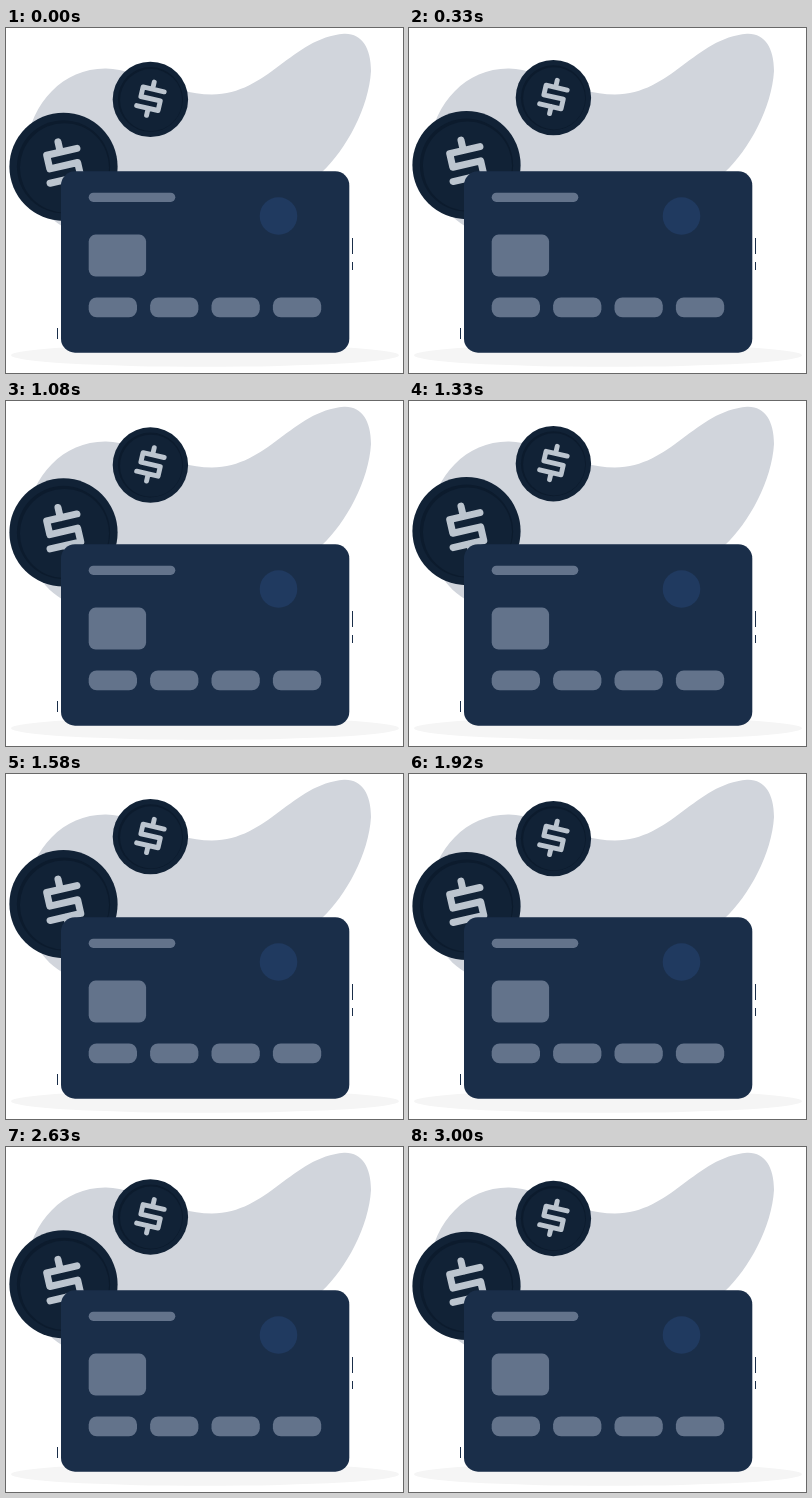
An HTML page with a canvas that plays this animation: 397x345 px, repeating every 3.04 s.

```html
<!DOCTYPE html>
<html lang="en">
<head>
<meta charset="utf-8">
<title>Card and coins</title>
<style>
html, body { margin: 0; width: 100%; height: 100%; overflow: hidden; background: #fff; }
canvas { display: block; }
</style>
</head>
<body>
<canvas id="stage" width="397" height="345"></canvas>
<script>
const W = 397, H = 345, LOOP = 3040, PEAK = 1460, RISE = 9.4;
const canvas = document.getElementById('stage');
const ctx = canvas.getContext('2d');
const dpr = window.devicePixelRatio || 1;
canvas.width = W * dpr;
canvas.height = H * dpr;
canvas.style.width = W + 'px';
canvas.style.height = H + 'px';

const blob = new Path2D(
  'M60 200 C38 190 16 160 20 120 C25 74 58 40 100 40.5 ' +
  'C137 42 162 66 206 66.5 C262 66 286 10 338 5.7 ' +
  'C356 5 365 20 365 43 C363 79 340 122 316 144 L120 200 Z');
const dollar = new Path2D(
  'M17 -14 H-14 V0 H14.5 V14 H-17 M0 -24.5 V-14 M0 14 V24.5');

function disc(x, y, r, color) {
  ctx.fillStyle = color;
  ctx.beginPath();
  ctx.arc(x, y, r, 0, Math.PI * 2);
  ctx.fill();
}

function box(x, y, w, h, r, color) {
  ctx.fillStyle = color;
  ctx.beginPath();
  ctx.roundRect(x, y, w, h, r);
  ctx.fill();
}

// Drawn at radius 54, then scaled
function coin(x, y, r, tilt) {
  ctx.save();
  ctx.translate(x, y);
  ctx.scale(r / 54, r / 54);
  disc(0, 0, 54, '#112236');
  disc(0, 0, 46.5, '#0c1b2d');
  disc(1, 1, 44.5, '#112236');
  ctx.translate(0, -1);
  ctx.rotate(tilt * Math.PI / 180);
  ctx.strokeStyle = '#bcc5cf';
  ctx.lineWidth = 7;
  ctx.lineCap = ctx.lineJoin = 'round';
  ctx.stroke(dollar);
  ctx.restore();
}

function card() {
  const pale = '#63738b';
  box(55, 143.3, 288.3, 181.4, 14, '#1a2e49');
  box(82.7, 164.7, 86.6, 9.2, 4.6, pale);
  box(82.7, 206.6, 57.4, 42, 7, pale);
  for (let i = 0; i < 4; i++) box(82.7 + i * 61.4, 269.5, 48.3, 19.8, 8, pale);
  disc(272.5, 188, 18.8, '#203a60');
}

// 0 at the bottom of the float, 1 at the top
function lift(t) {
  const gap = Math.abs(t - PEAK);
  const d = Math.min(gap, LOOP - gap) / (LOOP / 2);
  return ((1 + Math.cos(Math.PI * d)) / 2 + 1 - d) / 2;
}

function draw(t) {
  ctx.setTransform(dpr, 0, 0, dpr, 0, 0);
  ctx.fillStyle = '#fff';
  ctx.fillRect(0, 0, W, H);

  ctx.fillStyle = '#f5f5f5';
  ctx.beginPath();
  ctx.ellipse(199, 327.3, 194, 11.5, 0, 0, Math.PI * 2);
  ctx.fill();

  ctx.fillStyle = '#d1d5dc';
  ctx.fill(blob);

  const up = RISE * lift(t);
  coin(144.4, 71.6 - up, 37.7, 13);
  coin(57.5, 139 - up, 54.1, -13);
  card();

  ctx.fillStyle = '#1a2e49';
  ctx.fillRect(346, 210, 1, 16);
  ctx.fillRect(346, 234, 1, 8);
  ctx.fillRect(51, 300, 1, 11);
}

const start = performance.now();
function tick() {
  draw((performance.now() - start) % LOOP);
  requestAnimationFrame(tick);
}
tick();
</script>
</body>
</html>
```
